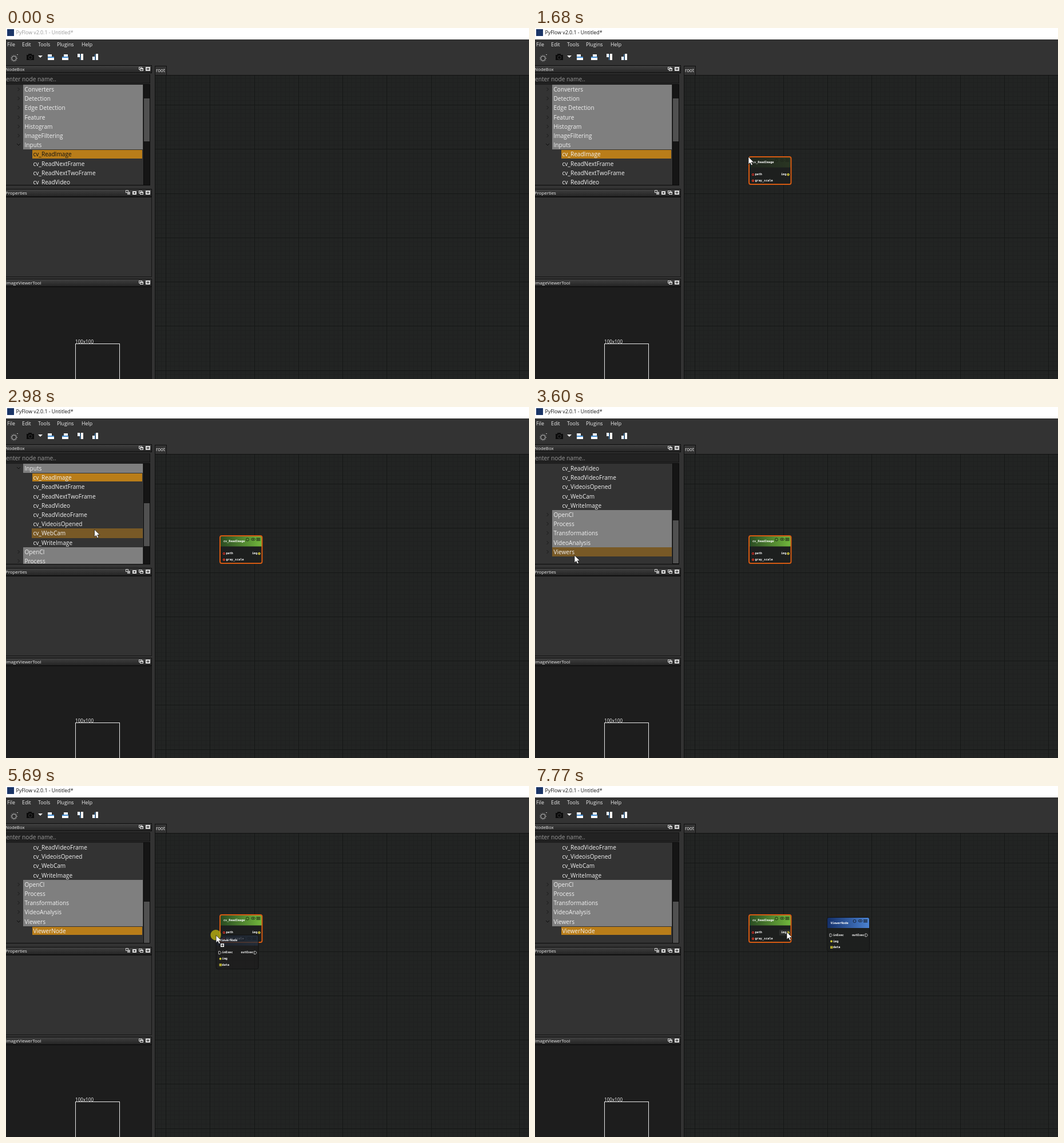
Recreate the animation shown at these times as an HTML page with a canvas. Size 914x613 px, loop 8000 ms.

```html
<!DOCTYPE html>
<html lang="en">
<head>
<meta charset="utf-8">
<title>Node editor</title>
<style>
html, body { margin: 0; width: 100%; height: 100%; overflow: hidden; background: #333; }
canvas { display: block; }
</style>
</head>
<body>
<canvas id="stage" width="914" height="613"></canvas>
<script>
const ctx = document.getElementById('stage').getContext('2d');
const LOOP = 8000, ROW = 16.2, TREE_TOP = 99;
const SANS = '"Open Sans", "Noto Sans", sans-serif';
const MONO = '"DejaVu Sans Mono", monospace';

// cv_ entries and ViewerNode are leaves; all others are groups.
const tree = [
  'Converters', 'Detection', 'Edge Detection', 'Feature', 'Histogram', 'ImageFiltering', 'Inputs',
  'cv_ReadImage', 'cv_ReadNextFrame', 'cv_ReadNextTwoFrame', 'cv_ReadVideo', 'cv_ReadVideoFrame',
  'cv_VideoisOpened', 'cv_WebCam', 'cv_WriteImage',
  'OpenCl', 'Process', 'Transformations', 'VideoAnalysis', 'Viewers', 'ViewerNode'
];
const isLeaf = name => name.startsWith('cv_') || name === 'ViewerNode';

// Pointer route: time, x, y
const route = [
  [70, 496, 478], [840, 95, 216], [920, 95, 216], [1210, 374, 226], [1610, 374, 226], [1680, 373, 225],
  [2360, 162, 210], [2850, 162, 210], [3600, 69, 259], [3680, 46, 261], [4290, 20, 254], [4460, 20, 254],
  [4690, 58, 257], [4840, 59, 256], [4920, 59, 256], [4990, 54, 252], [5220, 54, 252], [5990, 525, 265],
  [6070, 525, 252], [6300, 511, 237], [6530, 510, 230], [6770, 510, 230], [7230, 402, 264],
  [7540, 442, 257], [7770, 440, 255]
];
const scrollSteps = [[2740, 3], [2910, 6], [2990, 9], [3070, 10], [4990, 11]];
const presses = [[840, 1680], [4290, 4460], [5220, 6770]];

const nodes = {
  read: { title: 'cv_ReadImage', w: 73.5, h: 48, from: '#294a22', to: '#72b83c' },
  view: { title: 'ViewerNode', w: 74, h: 59.5, from: '#142f68', to: '#4b83d2' }
};

function rect(x, y, w, h, color) {
  ctx.fillStyle = color;
  ctx.fillRect(x, y, w, h);
}
function frame(x, y, w, h, color, width = 1) {
  ctx.strokeStyle = color;
  ctx.lineWidth = width;
  ctx.strokeRect(x + .5, y + .5, w - 1, h - 1);
}
function text(str, x, y, size, color = '#eee', font = `${size}px ${SANS}`) {
  ctx.font = font;
  ctx.textBaseline = 'middle';
  ctx.fillStyle = color;
  ctx.fillText(str, x, y);
}
function circle(x, y, r, fill, stroke) {
  ctx.beginPath();
  ctx.arc(x, y, r, 0, 7);
  if (fill) { ctx.fillStyle = fill; ctx.fill(); }
  if (stroke) { ctx.strokeStyle = stroke; ctx.stroke(); }
}
function shape(points, fill, stroke, width = 1) {
  ctx.beginPath();
  points.forEach(([x, y]) => ctx.lineTo(x, y));
  ctx.closePath();
  if (fill) { ctx.fillStyle = fill; ctx.fill(); }
  if (stroke) { ctx.strokeStyle = stroke; ctx.lineWidth = width; ctx.stroke(); }
}
function gradient(x0, y0, x1, y1, from, to) {
  const g = ctx.createLinearGradient(x0, y0, x1, y1);
  g.addColorStop(0, from);
  g.addColorStop(1, to);
  return g;
}

function pointerAt(t) {
  const i = route.findIndex(k => k[0] > t);
  if (i === 0) return null;
  if (i < 0) return route[route.length - 1].slice(1);
  const [t0, x0, y0] = route[i - 1], [t1, x1, y1] = route[i];
  const p = (t - t0) / (t1 - t0), e = p * p * (3 - 2 * p);
  return [x0 + (x1 - x0) * e, y0 + (y1 - y0) * e];
}

function titleBar(active) {
  rect(0, 0, 914, 20, '#fff');
  rect(2, 2, 12, 12, '#1b3567');
  text('PyFlow v2.0.1 - Untitled*', 17.5, 8.5, 8.8, active ? '#111' : '#999');
  [['File', 2], ['Edit', 28], ['Tools', 56], ['Plugins', 89], ['Help', 132]]
    .forEach(([s, x]) => text(s, x, 30, 8.8));
}

function toolbar() {
  ctx.lineWidth = 1;
  circle(14, 53, 4, null, '#bbb');
  ctx.setLineDash([1, 2]);
  circle(14, 53, 5.5, null, '#bbb');
  ctx.setLineDash([]);
  rect(19, 46, 2, 1, '#bbb');

  rect(36, 47, 13, 9, '#0b0b0b');
  rect(39, 45, 6, 3, '#0b0b0b');
  circle(42.5, 51.5, 3, null, '#3a3a3a');
  shape([[56, 48], [64, 48], [60, 52]], '#eee');

  const rows = (x, indent) => {
    rect(x + indent, 46, 7, 4, '#fff');
    rect(x, 50, 11, 2, '#3f8ad0');
    rect(x, 52, 11, 4, '#fff');
  };
  rows(73, 0);
  rows(98, 3);
  const columns = (x, top) => {
    rect(x, top, 4, 6, '#fff');
    rect(x + 4, 46, 1, 10, '#3f8ad0');
    rect(x + 6, 45, 4, 11, '#fff');
  };
  columns(125, 45);
  columns(151, 50);
}

function dockHeader(title, y, extra) {
  rect(0, y, 254, 14, gradient(0, y, 0, y + 14, '#424242', '#222'));
  frame(-1, y, 256, 14, '#0c0c0c');
  text(title, -1, y + 7.8, 7.85);
  frame(232, y + 3, 6, 5, '#ccc');
  rect(234, y + 5, 6, 5, '#ddd');
  rect(235, y + 7, 4, 2, '#444');
  rect(244, y + 3, 8, 7, '#ddd');
  rect(246, y + 5, 4, 3, '#333');
  rect(247, y + 6, 2, 1, '#ddd');
  if (!extra) return;
  frame(209, y + 2, 5, 5, '#ccc');
  rect(212, y + 5, 5, 5, '#aaa');
  rect(221, y + 4, 7, 6, '#ddd');
  rect(223, y + 6, 3, 2, '#333');
}

function nodeList(t, hoverRow, active) {
  const expanded = t >= 4460;
  const scroll = scrollSteps.reduce((s, [at, row]) => t >= at ? row : s, 0);
  const selected = t >= 5220 ? 'ViewerNode' : 'cv_ReadImage';
  rect(0, 81, 252, 16, '#222');
  frame(-1, 81, 253, 16, '#111');
  text('enter node name..', 0, 90.3, 10.2, '#999');

  ctx.save();
  ctx.beginPath();
  ctx.rect(0, TREE_TOP, 240, 175);
  ctx.clip();
  tree.slice(scroll, expanded ? 21 : 20).forEach((name, i) => {
    const y = Math.round(TREE_TOP + i * ROW), h = Math.round(TREE_TOP + (i + 1) * ROW) - y;
    const leaf = isLeaf(name), x = leaf ? 45 : 30, mid = y + 8.5;
    const isSelected = name === selected;
    if (isSelected) rect(x + 1, y + 1, 237 - x, h - 2, '#b97d19');
    else if (i === hoverRow) rect(x, y, 239 - x, h, '#785926');
    else if (!leaf) rect(x, y, 239 - x, h, '#7f7f7f');
    text(name, x + 2.5, mid + 1.2, 10.1, isSelected && !active ? '#111' : '#f2f2f2');
    if (leaf) return;
    const open = name === 'Inputs' || name === 'Viewers' && expanded;
    ctx.beginPath();
    if (open) { ctx.moveTo(19, mid - 2.5); ctx.lineTo(22, mid + .5); ctx.lineTo(25, mid - 2.5); }
    else { ctx.moveTo(20.5, mid - 3.5); ctx.lineTo(23.5, mid - .5); ctx.lineTo(20.5, mid + 2.5); }
    ctx.strokeStyle = open ? '#0c0c0c' : '#191919';
    ctx.lineWidth = 1;
    ctx.stroke();
  });
  ctx.restore();

  rect(240, 99, 11, 175, '#151515');
  const top = expanded ? 195 + 7 * (scroll - 10) : 123 + 7.5 * scroll;
  rect(241, top, 10, expanded ? 72 : 75, '#505050');
  frame(240, 98, 12, 177, '#0a0a0a');
  rect(0, 98, 240, 1, '#111');
  rect(0, 274, 252, 1, '#0a0a0a');
}

function panels(t, hoverRow, active) {
  dockHeader('NodeBox', 65);
  nodeList(t, hoverRow, active);
  dockHeader('Properties', 281, true);
  frame(-1, 295, 256, 140, '#151515');
  dockHeader('ImageViewerTool', 438);
  rect(0, 453, 254, 160, '#1d1d1d');
  frame(-1, 452, 256, 170, '#151515');
  frame(121, 551, 78, 80, '#e8e8e8');
  text('100x100', 121, 548.8, 8.1);
}

function graphBackground() {
  rect(260, 66, 21, 16, '#333');
  frame(260, 66, 21, 17, '#111');
  text('root', 262, 75, 8.2);
  rect(260, 83, 654, 530, '#222423');
  const step = 7.725;
  for (let i = -2; i < 83; i++) rect(Math.round(279 + i * step), 83, 1, 530, i % 10 ? '#1f2020' : '#151716');
  for (let i = -6; i < 62; i++) rect(260, Math.round(134 + i * step), 654, 1, i % 10 ? '#1f2020' : '#151716');
  for (let i = 0; i < 9; i++) rect(Math.round(279 + i * step * 10), 83, 1, 530, '#151716');
  frame(260, 82, 660, 540, '#111');
}

function drawNode(kind, x, y, { dim = false, selected = false, pinHover = false } = {}) {
  const { title, w, h, from, to } = nodes[kind];
  const label = (s, dx, dy) => text(s, x + dx, y + dy, 5.2, '#fff', `bold 5.2px ${MONO}`);
  ctx.save();
  ctx.beginPath();
  ctx.roundRect(x, y, w, h, 3);
  ctx.fillStyle = dim && !selected ? 'rgba(28,29,29,.75)' : '#1d1f1e';
  ctx.fill();
  ctx.save();
  ctx.clip();
  ctx.globalAlpha = dim ? .15 : 1;
  rect(x, y, w, 18.5, gradient(x, 0, x + w, 0, from, to));
  ctx.restore();
  ctx.strokeStyle = selected ? '#d55a12' : '#121313';
  ctx.lineWidth = selected ? 2 : 1;
  ctx.stroke();

  ctx.globalAlpha = dim ? .35 : .75;
  ctx.lineWidth = 1;
  circle(x + 48, y + 6.5, 2.5, null, '#111');
  ctx.beginPath();
  ctx.ellipse(x + 58, y + 6, 3.5, 2, 0, 0, 7);
  ctx.stroke();
  circle(x + 58, y + 6, 1, '#111');
  for (let i = 0; i < 3; i++) rect(x + 63.5, y + 3.5 + i * 2, 7, 1.3, '#111');
  ctx.globalAlpha = 1;

  label(title, 6, 10);
  if (kind === 'read') {
    if (pinHover) rect(x + 53, y + 26, 19, 10, '#2d2f2e');
    circle(x + 7, y + 31, 1.7, '#5a1512', '#d8382c');
    circle(x + 7, y + 41.7, 1.8, '#a82c1c', '#c63a25');
    label('path', 10.5, 31);
    label('gray_scale', 10.5, 41.7);
    label('img', 56, 31);
    circle(x + 68.5, y + 31, 1.8, '#8d8423', '#e6dd45');
  } else {
    const exec = dx => shape([[dx, 28.5], [dx + 2.5, 28.5], [dx + 4.5, 31], [dx + 2.5, 33.5], [dx, 33.5]]
      .map(([a, b]) => [x + a, y + b]), null, '#ddd', .8);
    exec(4.5);
    exec(66.5);
    label('inExec', 10.5, 31);
    label('outExec', 43.5, 31);
    circle(x + 7.5, y + 41.7, 2, '#c9bf32');
    label('img', 10.5, 41.7);
    rect(x + 5.5, y + 50, 4.5, 4.5, '#aea62c');
    label('data', 10.5, 52.3);
  }
  ctx.restore();
}

function drawPointer([x, y], pressed, dragging) {
  if (pressed) circle(x - .5, y - .5, 9.2, 'rgba(178,168,18,.85)');
  const arrow = [[0, 0], [0, 13], [3, 10.3], [5, 14.8], [7.3, 13.8], [5.3, 9.4], [9.4, 9.4]];
  shape(arrow.map(([a, b]) => [x + a, y + b]), '#fff', '#111', .7);
  if (!dragging) return;
  rect(x + 8, y + 14.5, 6, 6, '#f4f4f4');
  rect(x + 10.5, y + 15.5, 1, 4, '#111');
  rect(x + 9, y + 17, 4, 1, '#111');
}

function draw(now) {
  const t = now % LOOP;
  const pointer = pointerAt(t);
  const [px, py] = pointer || [-1, -1];
  const active = t >= 840;
  const pressed = presses.some(([a, b]) => t >= a && t < b);
  const dragging = pressed && (t > 920 && t < 1680 || t > 5220);
  const overTree = px >= 0 && px < 240 && py >= TREE_TOP && py < 274;
  const hoverRow = overTree && !dragging ? Math.floor((py - TREE_TOP) / ROW) : -1;

  rect(0, 0, 914, 613, '#333');
  titleBar(active);
  toolbar();
  panels(t, hoverRow, active);
  graphBackground();

  if (t >= 1680) {
    const pinHover = t > 6770 && px > 427 && px < 447 && py > 250 && py < 261;
    drawNode('read', 374, 225, { dim: t < 1750, selected: true, pinHover });
  }
  if (t >= 6770) drawNode('view', 510.5, 229.5, { dim: t < 6840 });
  if (dragging && px > 260) drawNode(t < 1680 ? 'read' : 'view', px, py - .5, { dim: true });
  if (pointer) drawPointer(pointer, pressed, dragging);
  requestAnimationFrame(draw);
}
requestAnimationFrame(draw);
</script>
</body>
</html>
```
